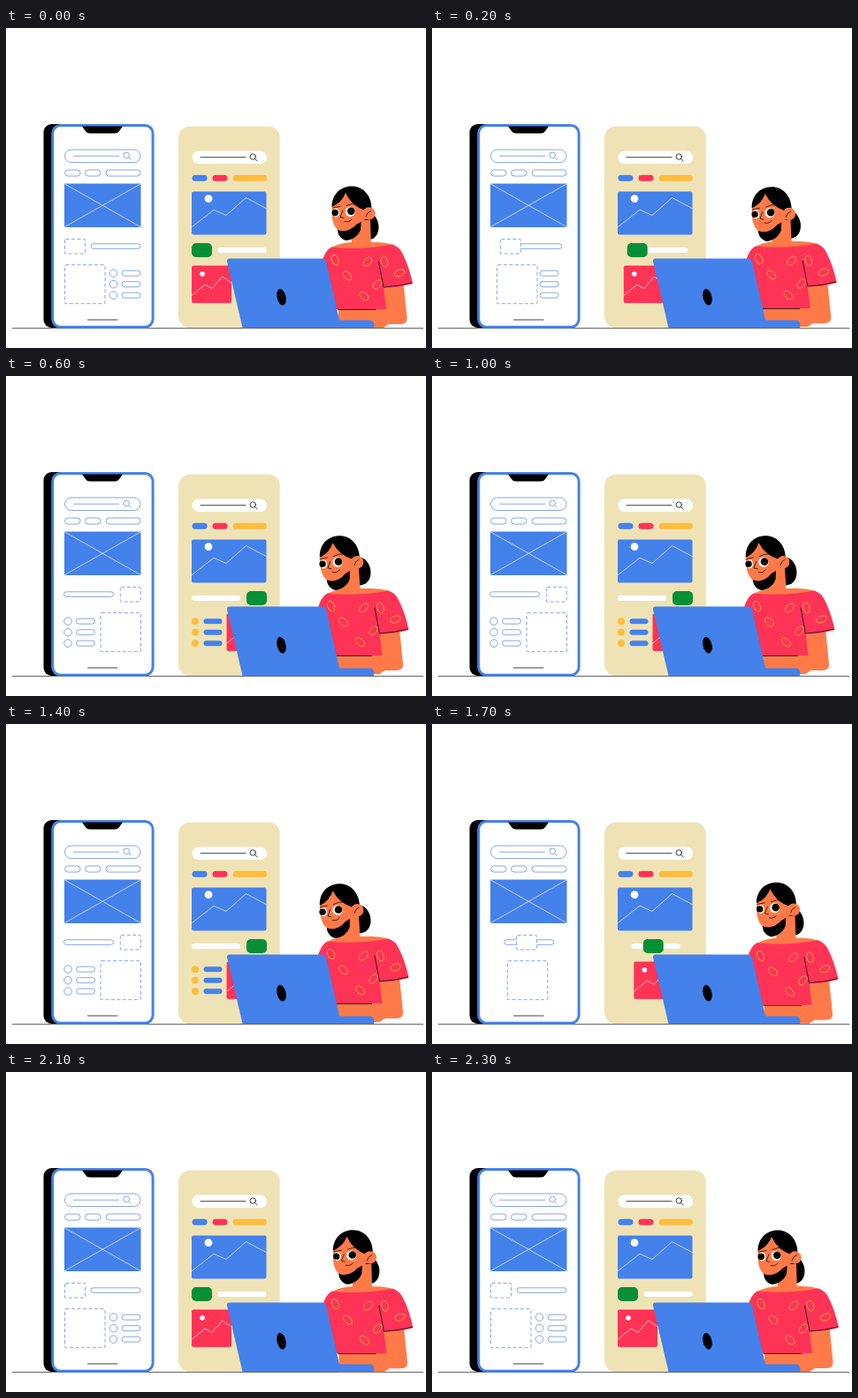
Recreate the animation shown at these times as an HTML page. Size 475 by 363 pixels, loop 2.4 s.

```html
<!DOCTYPE html>
<html lang="en">
<head>
<meta charset="utf-8">
<title>Layout mirroring</title>
<style>
html, body { margin: 0; width: 100%; height: 100%; overflow: hidden; background: #fff; }
svg { display: block; width: 475px; height: 363px; }
.wire { fill: #fff; stroke: #5f8ae0; stroke-width: .75; }
.dash { stroke-dasharray: 4 2.5; }
.thin { fill: none; stroke: #111; stroke-width: .8; stroke-linecap: round; stroke-linejoin: round; }
.white { stroke: #fff; stroke-width: .65; }
.blue { fill: #4481eb; }
.red { fill: #ff3356; }
.yellow { fill: #ffbd3f; }
.green { fill: #078f36; }
.skin { fill: #ff7a48; }
.leaf { fill: none; stroke: #ffa640; stroke-width: .9; }
</style>
</head>
<body>
<svg viewBox="0 0 475 363">
  <path d="M7 340.500H472" stroke="#666"/>

  <!-- phone wireframe -->
  <rect x="42.500" y="109" width="112" height="231" rx="9"/>
  <rect x="52.700" y="110.500" width="113.400" height="228.800" rx="9" fill="#fff" stroke="#4481eb" stroke-width="3"/>
  <path d="M86 111.500H132L128 117Q126.500 119.500 123 119.500H95Q91.500 119.500 90 117Z"/>
  <g class="wire">
    <rect x="66.500" y="138" width="85.500" height="14.500" rx="7.250"/>
    <path d="M76 145.200H128M138.700 146.700L141.700 149.300"/>
    <circle cx="136.200" cy="144.300" r="3.300"/>
    <rect x="66.500" y="161" width="17.500" height="7" rx="3.500"/>
    <rect x="89.500" y="161" width="17.500" height="7" rx="3.500"/>
    <rect x="113" y="161" width="39" height="7" rx="3.500"/>
  </g>
  <rect class="blue" x="66" y="176.500" width="86.500" height="49.500"/>
  <path class="thin white" d="M66.500 177L152 225.500M152 177L66.500 225.500"/>
  <g class="wire">
    <rect data-dx="-30.5" x="96" y="244.800" width="56" height="5.500" rx="2.750"/>
    <rect data-dx="62.8" class="dash" x="66.500" y="239.500" width="23" height="16.500" rx="1"/>
    <g data-dx="-51.5" id="wireList"></g>
    <rect data-dx="40.5" class="dash" x="66.500" y="268.700" width="45.500" height="44" rx="1"/>
  </g>
  <path class="thin" d="M92.500 331H126"/>

  <!-- finished screen -->
  <rect x="195" y="111.500" width="114.800" height="228.500" rx="13" fill="#efe3b6"/>
  <rect x="210.500" y="139.500" width="84.500" height="14.500" rx="7.250" fill="#fff"/>
  <path class="thin" d="M220 146.700H271M281.500 148.500L284.200 150.800"/>
  <circle class="thin" cx="279.200" cy="146" r="3.200"/>
  <rect class="blue" x="210.500" y="166.700" width="17" height="7" rx="3.500"/>
  <rect class="red" x="233.500" y="166.700" width="17" height="7" rx="3.500"/>
  <rect class="yellow" x="256.500" y="166.700" width="38.500" height="7" rx="3.500"/>
  <rect class="blue" x="210" y="185.500" width="84.500" height="49" rx="2"/>
  <circle cx="229" cy="193.700" r="4.400" fill="#fff"/>
  <path class="thin white" d="M210.500 225.500L235 206.300L249 212.500L271.500 192.500L294 204.500"/>
  <rect data-dx="-29.5" x="239.500" y="249" width="55" height="6" rx="3" fill="#fff"/>
  <rect data-dx="62" class="green" x="210" y="244" width="23" height="16" rx="5"/>
  <g data-dx="-51" id="colorList"></g>
  <g data-dx="39.5">
    <rect class="red" x="210" y="269.500" width="45" height="42.500" rx="2"/>
    <circle cx="222" cy="279" r="2.800" fill="#fff"/>
    <path class="thin white" d="M210.500 303L225 291L233 295.500L244.500 282L255 289"/>
  </g>

  <!-- woman -->
  <path id="bob" d="M405 209C414 206 421.500 216 421.500 226C421.500 236 414 242 406 240L398 236V216Z"/>
  <path id="neck" stroke="#ff7a48" stroke-width="22" fill="none"/>
  <g id="body">
    <path class="skin" d="M425 286L449 284L453.500 329Q454 336 446 336H433L427 340H376V314H428ZM368 249Q378 243.500 392 243H414Q428 242.500 438 246L400 256Z"/>
    <path class="red" d="M357 266Q361 252 368 248.500Q403 252 437 245.500Q445 248 449 257Q456 271 460 290Q444 294.500 427 294.500L430 319H372L359 280Z"/>
    <path class="thin" d="M421.500 265L427 294Q444 293 459 289M375 319.500H418"/>
    <g id="leaves"></g>
  </g>
  <g id="head">
    <path d="M375 228L402 216L401 229C398 237 390 241 384 241C378 239 375 234 375 228Z"/>
    <path class="skin" d="M369.500 197C368 208 367.500 221 374 228C380 232.500 390 230 396 223L408 216L409 195L390 183Z"/>
    <path d="M368.500 203C368.500 189 378 179.500 391 179.500C404 179.500 413.500 190 413.500 205L406 207Q391 202 384 187Q380 198 368.500 203Z"/>
    <circle class="skin" cx="410.500" cy="210.500" r="7.200"/>
    <path class="thin" d="M407 214Q408 209 412.500 207.500"/>
    <g id="face">
      <ellipse cx="373.300" cy="209.500" rx="4" ry="5" fill="#fff"/>
      <circle cx="389.300" cy="208.300" r="5.600" fill="#fff"/>
      <circle cx="372.300" cy="209.500" r="3.700"/>
      <circle cx="390.300" cy="207.800" r="4.300"/>
      <path class="thin" d="M369.500 204L378 202.500M385 201.500Q391 198.500 397 199.500M381 207L378 214.500L382 215.500M383 219.500Q388 221 391 217"/>
    </g>
  </g>

  <!-- laptop -->
  <path class="blue" d="M253 261.500H357.500Q361 261.500 362 265L377 331.500H411Q416 331.500 416.500 337L416 340H267.500L250 265Q249.500 261.500 253 261.500Z"/>
  <ellipse cx="311.500" cy="305.300" rx="5" ry="9.500" transform="rotate(-13 311.500 305.300)"/>
</svg>
<script>
const $ = id => document.getElementById(id);

const rows = [278.2, 290.7, 303.2];
$('wireList').innerHTML = rows.map(y =>
  `<circle cx="121.500" cy="${y}" r="4.300"/>
   <rect x="131" y="${y - 3}" width="21" height="6" rx="3"/>`).join('');
$('colorList').innerHTML = rows.map(y =>
  `<circle class="yellow" cx="265" cy="${y}" r="4"/>
   <rect class="blue" x="274.500" y="${y - 3}" width="21" height="6" rx="3"/>`).join('');

// x, y, angle of each leaf
$('leaves').innerHTML = [
  [372, 263, -25], [409, 265, 45], [428, 265, -15],
  [386, 281, -45], [445, 278, 70], [405, 304, -45], [420, 291, 40]
].map(([x, y, a]) =>
  `<ellipse class="leaf" rx="3.700" ry="6" transform="translate(${x} ${y}) rotate(${a})"/>`).join('');

function ease(t, from, to) {
  const p = Math.min(1, Math.max(0, (t - from) / (to - from)));
  return p * p * (3 - 2 * p);
}

const movers = document.querySelectorAll('[data-dx]');
const shift = (el, x, y = 0) => el.setAttribute('transform', `translate(${x} ${y})`);

function draw(now) {
  const t = Math.floor(now % 2400 / 100) * 100;
  const flip = ease(t, 85, 520) - ease(t, 1480, 1900);
  const lean = ease(t, 0, 400) - 1.2 * ease(t, 1400, 1850) + .2 * ease(t, 1900, 2300);

  for (const el of movers) shift(el, el.dataset.dx * flip);
  shift($('body'), -4.5 * lean, -2 * lean);
  shift($('bob'), -9 * lean, -3 * lean);
  shift($('face'), -lean, lean);
  $('head').setAttribute('transform',
    `translate(${-12.5 * lean} ${1.5 * lean}) rotate(${-3 * lean} 395 225)`);
  $('neck').setAttribute('d', `M${401 - 13 * lean} 218L${402 - 12 * lean} 250`);
  requestAnimationFrame(draw);
}
requestAnimationFrame(draw);
</script>
</body>
</html>
```
